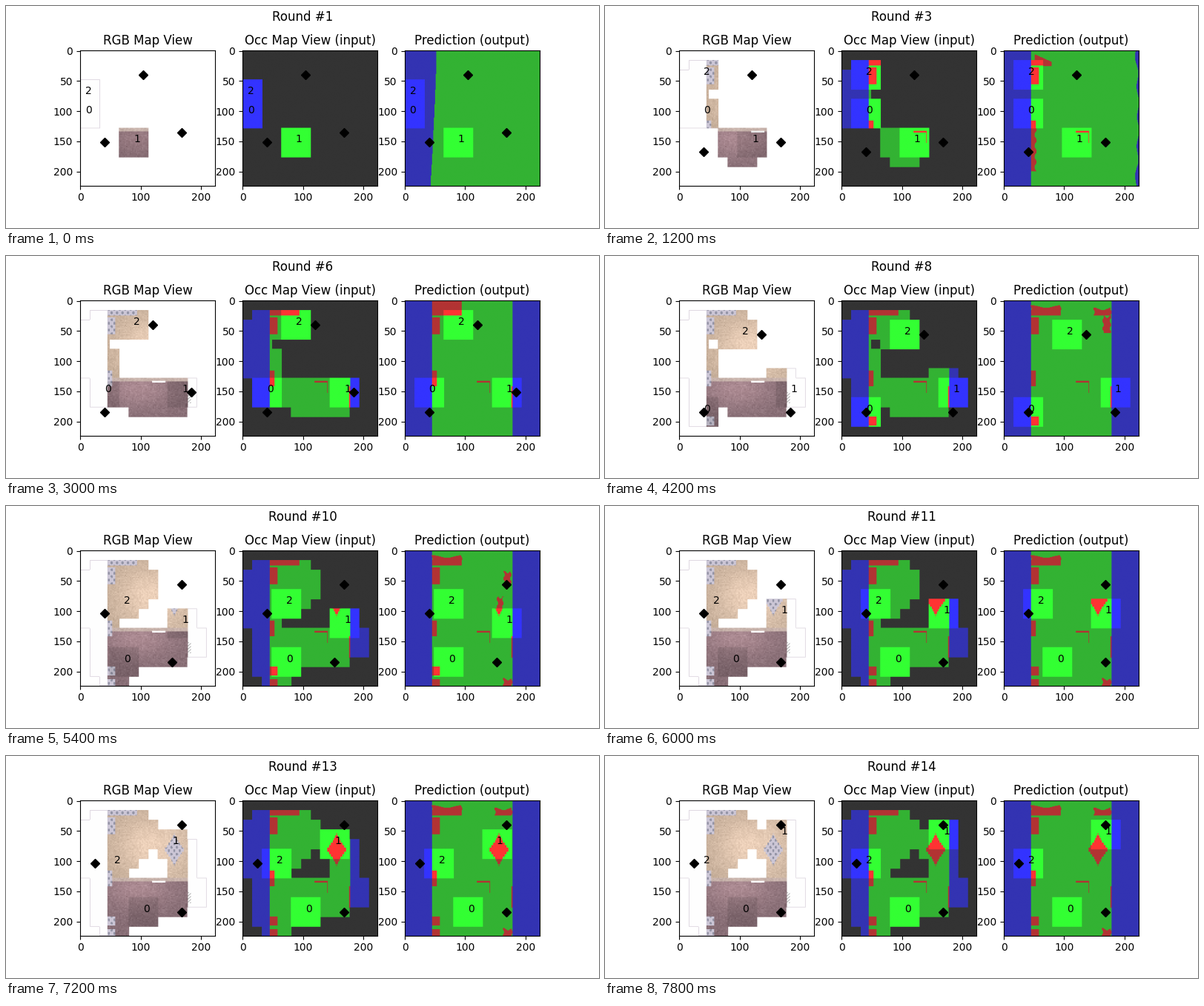
A matplotlib script that plays this animation: 800x300 px, repeating every 8 s.

```python
import numpy as np
import matplotlib.pyplot as plt
from matplotlib.animation import FuncAnimation

N = 224          # map size
CELL = 16        # agents move on a coarse grid
REACH = 24       # half width of a view
ROUNDS = 14
RED, GREEN, BLUE = 0, 1, 2
LEFT, RIGHT = 45, 178

# turning points; an agent moves one cell per round, also diagonally
ROUTES = {
    "0": [(0, 6), (2, 6), (2, 11), (3, 12), (4, 11), (6, 11)],
    "1": [(5, 9), (6, 10), (7, 9), (8, 10), (9, 10), (10, 9), (10, 8),
          (11, 9), (10, 8), (10, 5), (9, 4), (10, 3)],
    "2": [(0, 4), (2, 2), (5, 2), (5, 3), (6, 3), (2, 5), (3, 6), (2, 6)],
}

# each goal jumps to a cell at a given round
GOALS = [
    {0: (6, 2), 1: (7, 2), 6: (8, 3), 8: (10, 3), 11: (10, 2)},
    {0: (10, 8), 1: (10, 9), 4: (11, 9), 6: (11, 10), 7: (11, 11),
     8: (9, 11), 10: (10, 11)},
    {0: (2, 9), 2: (2, 10), 4: (2, 11), 8: (2, 6), 12: (1, 6)},
]

Y, X = np.mgrid[:N, :N]
rng = np.random.default_rng(4)


def walk(route):
    """One cell per round along the route, resting at its end."""
    x, y = route[0]
    path = [(x, y)]
    for tx, ty in route[1:]:
        while (x, y) != (tx, ty):
            x += np.sign(tx - x)
            y += np.sign(ty - y)
            path.append((x, y))
    return path + [path[-1]] * (ROUNDS - len(path))


def center(cell):
    return cell[0] * CELL + CELL // 2, cell[1] * CELL + CELL // 2


def goal_spots(rnd):
    cells = [goal[max(start for start in goal if start <= rnd)]
             for goal in GOALS]
    return np.array([center(cell) for cell in cells])


def box(x0, x1, y0, y1):
    return (X >= x0) & (X < x1) & (Y >= y0) & (Y < y1)


def blob(x0, x1, y0, y1):
    """Box with ragged sides and a sagging top."""
    wobble = np.round(1.5 * np.sin(Y * 0.5 + x0))
    sag = np.round(4 * np.sin(np.pi * (X - x0) / (x1 - x0)) ** 2)
    return ((X >= x0 + wobble) & (X < x1 + wobble)
            & (Y >= y0 + sag) & (Y < y1))


def view(cell):
    cx, cy = center(cell)
    return (abs(X - cx) <= REACH) & (abs(Y - cy) <= REACH)


def stepped_diamond(cx, cy, width, height, step=4):
    dy = abs(Y - cy) // step * step
    half = width * np.clip(1 - dy / height, 0, 1) ** 1.3
    return (abs(X - cx) <= half) & (dy < height - 1)


def fade(cx, cy, rx, ry):
    """Soft round light."""
    return np.exp(-((X - cx) / rx) ** 2 - ((Y - cy) / ry) ** 2)[..., None]


OUTSIDE = (X < LEFT) | (X >= RIGHT)
TABLE = stepped_diamond(155, 81, 15, 26)
DOOR = box(119, 141, 133, 136)
SHELF = box(LEFT, 94, 15, 25)
FURNITURE = SHELF | TABLE
for top, bottom, depth in [(28, 56, 13), (116, 142, 8),
                           (192, 207, 13), (213, N, 13)]:
    FURNITURE |= box(LEFT, LEFT + depth, top, bottom)


def make_truth():
    cls = np.where(OUTSIDE, BLUE, GREEN)
    jamb = box(140, 141, 136, 153)
    wall = box(RIGHT - 2, RIGHT, 142, 178)
    cls[FURNITURE | DOOR | jamb | wall] = RED
    return cls


def make_photo():
    """Colour picture of the floor plan seen from above."""
    img = np.array([0.76, 0.67, 0.59]) + fade(115, 76, 55, 50) * [.17, .15, .14]
    img[(X >= 140) & (Y < 134)] += 0.03
    mauve = np.array([0.53, 0.43, 0.46]) + fade(95, 145, 60, 32) * [.14, .11, .11]
    low = Y >= 134
    img[low] = mauve[low]
    img[box(LEFT, RIGHT, 128, 134)] = [0.78, 0.70, 0.67]
    grain = rng.normal(0, 0.022, (N // 2, N // 2))
    img += np.kron(grain, np.ones((2, 2)))[..., None]

    img[FURNITURE] = [0.80, 0.78, 0.84]
    spots = np.sin(X * 0.7) * np.sin(Y * 0.55) > 0.35
    img[FURNITURE & spots] = [0.58, 0.58, 0.65]
    img[DOOR] = 1
    img[OUTSIDE] = 0.998
    img[box(RIGHT, RIGHT + 5, 152, 170) & ((X + Y) % 5 < 2)] = 0.72
    return np.clip(img, 0, 1)


TRUTH = make_truth()
PHOTO = make_photo()


def occ_image(cls, known, now):
    """Dim colour where known, full colour in the current views."""
    gain = 0.5 * known + 0.3 * now
    return np.clip(0.2 + np.eye(3)[cls] * gain[..., None], 0, 1)


def photo_image(seen, now):
    img = np.ones((N, N, 3))
    img[seen] = PHOTO[seen]
    img[now & ~OUTSIDE & (Y >= 134)] *= 0.89
    inner = seen.copy()
    for axis in (0, 1):
        for step in (-1, 1):
            inner &= np.roll(seen, step, axis)
    img[seen & ~inner & OUTSIDE] = [0.86, 0.83, 0.87]
    return img


def guess(rnd, seen):
    """Predicted classes: a guess, overruled by what has been seen."""
    left = 52 - 10 * (Y / N) ** 1.3 if rnd == 0 else LEFT
    right = RIGHT + 46 * (1 - min(rnd / 5, 1) ** 3)
    if 0 < rnd < 5:
        right = right - np.round(2 * np.sin(Y * 0.13) + 4 * (Y / 110 - 1) ** 2)
    cls = np.where((X < left) | (X >= right), BLUE, GREEN)

    red = np.zeros((N, N), bool)
    if rnd in (1, 2):
        red |= box(51, 79, 0, 26) & (Y > 6 + (X - 51) * 0.45)
        red |= box(LEFT, 80, 117, 200) & (X < 52 + 2 * np.sin(Y * 0.35))
    elif rnd in (3, 4, 5):
        red |= box(LEFT, 94, 0, 25)
    elif rnd > 5:
        red |= blob(LEFT, 94, 8, 25)
    if rnd in (6, 7, 12, 13):
        red |= blob(149, 177, 12, 25)
    if rnd in (6, 7):
        red |= blob(164, 176, 25, 54)
    if rnd in (8, 9):
        red |= blob(164, 175, 34, 58) | blob(153, 162, 76, 104)
    if rnd >= 8:
        red |= blob(163, 177, 211, N)
    cls[red] = RED
    cls[seen] = TRUTH[seen]
    return cls


def build_rounds(paths):
    seen = np.zeros((N, N), bool)
    rounds = []
    for rnd in range(ROUNDS):
        now = np.any([view(path[rnd]) for path in paths.values()], axis=0)
        seen = seen | now
        rounds.append((photo_image(seen, now),
                       occ_image(TRUTH, seen, now),
                       occ_image(guess(rnd, seen), np.ones((N, N)), now)))
    return rounds


paths = {name: walk(route) for name, route in ROUTES.items()}
images = build_rounds(paths)

plt.rcParams["font.family"] = "DejaVu Sans"
fig, axes = plt.subplots(1, 3, figsize=(8, 3), dpi=100)
heading = fig.suptitle("Round #1")

panels = []
titles = ["RGB Map View", "Occ Map View (input)", "Prediction (output)"]
for ax, title, picture in zip(axes, titles, images[0]):
    ax.set_title(title)
    image = ax.imshow(picture)
    ax.autoscale(False)
    marks, = ax.plot([], [], "kD")
    labels = {name: ax.text(0, 0, name) for name in paths}
    panels.append((image, marks, labels))


def update(i):
    rnd = i // 3
    heading.set_text(f"Round #{rnd + 1}")
    spots = goal_spots(rnd)
    for (image, marks, labels), picture in zip(panels, images[rnd]):
        image.set_data(picture)
        marks.set_data(spots[:, 0], spots[:, 1])
        for name, label in labels.items():
            label.set_position(center(paths[name][rnd]))
    return []


anim = FuncAnimation(fig, update, frames=40, interval=200, repeat=True)
plt.show()
```
